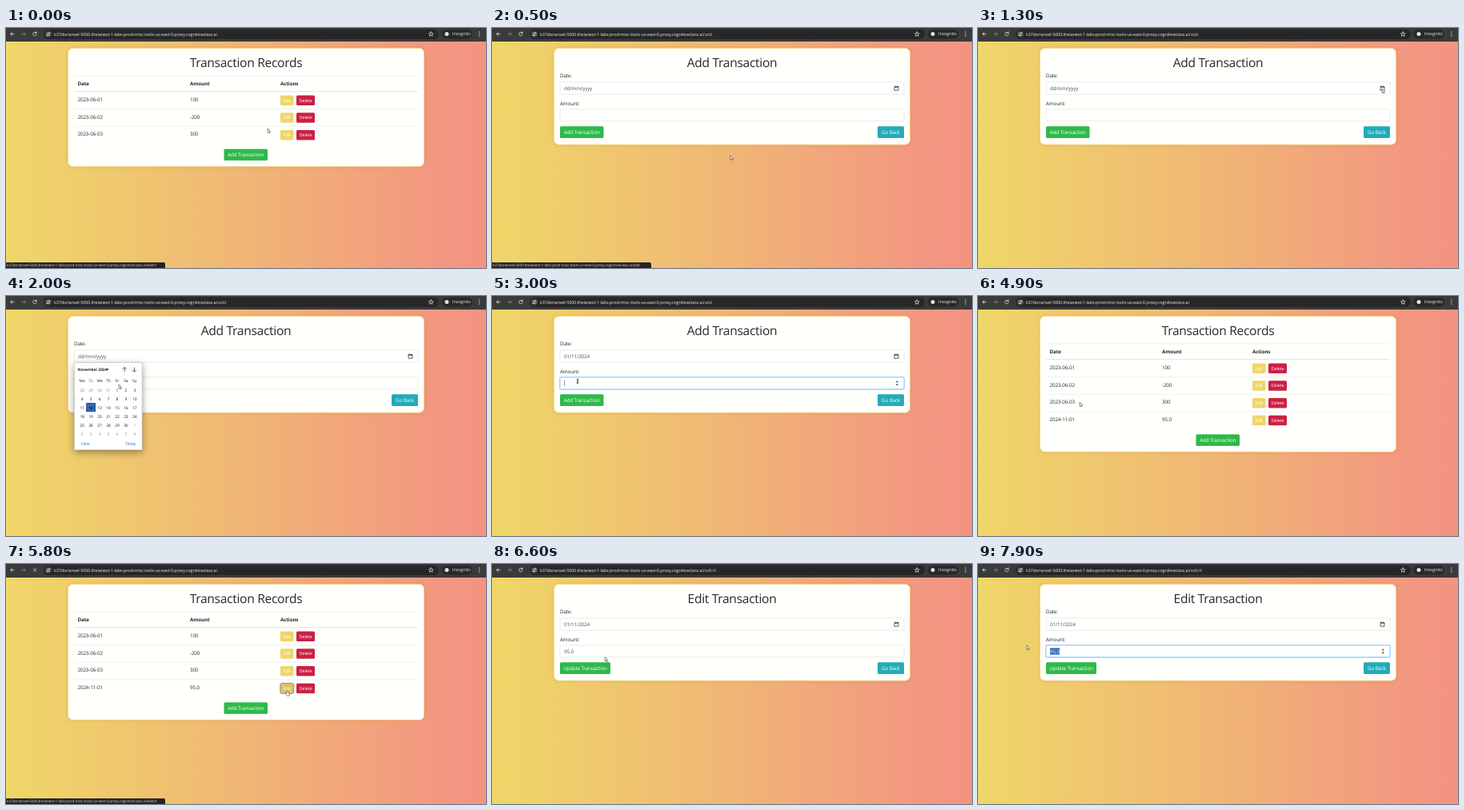
An HTML page for the animation above (8000 ms loop, 600 by 301 pixels).

```html
<!DOCTYPE html>
<html lang="en">
<head>
<meta charset="utf-8">
<title>Transaction Records</title>
<style>
  html, body { margin: 0; width: 100%; height: 100%; overflow: hidden; background: #f0b873; }
  svg { display: block; width: 100%; height: 100%; }
  text {
    font: 6.25px "Open Sans", "Noto Sans", sans-serif;
    letter-spacing: -.02em;
    fill: #26292d;
    text-rendering: geometricPrecision;
    white-space: pre;
  }
  .title { font-size: 15.625px; font-weight: 500; text-anchor: middle; }
  .head { font-weight: 700; }
  .label { fill: #fff; text-anchor: middle; }
  .small { font-size: 5.4px; }
  .value { fill: #495057; }
  .picked { fill: #fff; }
  .url { font-size: 5.45px; fill: #ececec; }
  .path { fill: #c4c4c4; }
  .status { font-size: 4.65px; fill: #d6d6d6; }
  .day { font-size: 4.9px; text-anchor: middle; fill: #16181a; }
  .dim { fill: #8a8a8a; }
  .blue { fill: #1b62c4; }
  .card { fill: #fffffc; stroke: #f8d98c; stroke-width: .8; filter: drop-shadow(0 0 2px rgba(190, 120, 30, .3)); }
  .popup { fill: #fff; stroke: #a9a9a9; stroke-width: .5; filter: drop-shadow(0 3px 5px rgba(0, 0, 0, .38)); }
  .rule { stroke: #dee2e6; stroke-width: .5; }
  .rule.thick { stroke-width: .9; }
  .field { fill: #fffffd; stroke: #d3d7db; stroke-width: .5; }
  .field.focus { stroke: #80bdff; stroke-width: .7; }
  .halo { fill: #bfdeff; }
  .icon { fill: none; stroke: #dcdcdc; stroke-width: .8; stroke-linecap: round; stroke-linejoin: round; }
  .icon.off { stroke: #858585; }
  .ink { fill: none; stroke: #222; stroke-width: .7; }
  .pointer { fill: #fff; stroke: #333; stroke-width: .55; stroke-linejoin: round; }
</style>
</head>
<body>
<svg id="stage" viewBox="0 0 600 301"></svg>
<script>
const LOOP = 8000;
const HOST = "k37dorianvel-5000.theianext-1-labs-prod-misc-tools-us-east-0.proxy.cognitiveclass.ai";
const GREEN = "#2fb94a", GREEN_HOVER = "#209a38", RED = "#cb2044", YELLOW = "#efd568", TEAL = "#23abb8";

// Moments at which the page changes, in ms
const T = { add: 400, calendar: 1400, date: 2300, amount: 2700, nine: 3700, five: 3900,
            submit: 4600, list: 4800, editClick: 5700, edit: 6000, refocus: 6800, drag: 7200 };

// Pointer tip: time, x, y
const PATH = [
  [0, 327, 126], [60, 327, 126], [280, 298, 160], [750, 298, 160], [1300, 505, 76],
  [1450, 505, 76], [2000, 141, 111], [2200, 139, 117], [2320, 139, 117], [2620, 107, 107],
  [4080, 107, 107], [4400, 127, 133], [5000, 127, 133], [5600, 351, 159], [6150, 351, 159],
  [6750, 103, 109], [7200, 103, 109], [7700, 61, 102], [8000, 61, 102]
];

const span = (...pairs) => pairs.map(p => p.join("-")).join(" ");
const group = (on, ...parts) => `<g data-on="${on}">${parts.join("")}</g>`;
const text = (x, y, str, cls = "") => `<text x="${x}" y="${y}" class="${cls}">${str}</text>`;
const rect = (x, y, w, h, attrs = "") => `<rect x="${x}" y="${y}" width="${w}" height="${h}" ${attrs}/>`;
const path = (d, cls = "icon") => `<path d="${d}" class="${cls}"/>`;
const rule = (y, cls = "") => `<line x1="85" x2="515" y1="${y}" y2="${y}" class="rule ${cls}"/>`;
const card = h => rect(77.5, 25.3, 445, h, 'rx="6" class="card"');

function button(x, y, w, h, label, color, small = "") {
  return rect(x, y, w, h, `rx="1.5" fill="${color}"`) +
    text(x + w / 2, y + h / 2 + (small ? 1.95 : 2.2), label, "label " + small);
}

function chrome() {
  const busy = span([300, T.add], [T.submit, T.list], [T.editClick, T.edit]);
  const idle = span([0, 300], [T.add, T.submit], [T.list, T.editClick], [T.edit, LOOP]);
  return rect(0, 0, 600, 17, 'fill="#3a3a3a"') +
    rect(47, 1.4, 494, 12.6, 'rx="6.3" fill="#272727"') +
    rect(544.5, 1.8, 38.5, 11.8, 'rx="5.9" fill="#292929"') +
    path("M10.2 7.5H5.8M7.9 5.3L5.7 7.5L7.9 9.7") +
    path("M19.8 7.5H24.2M22.1 5.3L24.3 7.5L22.1 9.7", "icon off") +
    group(idle, path("M37.9 6.2A2.3 2.3 0 1 0 38.2 8.2M38.2 4.8V6.5H36.5")) +
    group(busy, path("M34.3 5.7L37.9 9.3M37.9 5.7L34.3 9.3")) +
    '<circle cx="53" cy="7.7" r="4.4" fill="#3f3f3f"/>' +
    path("M50.8 6.4H53M55 6.4H55.2M50.8 9H51M53 9H55.2") +
    '<circle cx="54" cy="6.4" r=".8" class="icon"/><circle cx="52" cy="9" r=".8" class="icon"/>' +
    `<text x="60" y="9.6" class="url">${HOST}` +
    `<tspan class="path" data-on="${span([T.add, T.list])}">/add</tspan>` +
    `<tspan class="path" data-on="${span([T.edit, LOOP])}">/edit/4</tspan></text>` +
    path("M531.3 4.9l.8 1.8 2 .2-1.5 1.3.5 2-1.8-1-1.8 1 .5-2-1.5-1.3 2-.2z") +
    '<circle cx="551" cy="7.6" r="2.5" fill="#e2e2e2"/>' +
    text(558, 9.4, "Incognito", "url small") +
    [5, 7.5, 10].map(y => `<circle cx="591.8" cy="${y}" r=".65" fill="#ddd"/>`).join("");
}

function records(rows, on, hover) {
  const bottom = 79.8 + rows.length * 21.75;
  const add = color => button(272.5, bottom + 6.6, 54.5, 14.6, "Add Transaction", color);
  return group(on, card(bottom + 8.7 + 20 - 25.3),
    text(300, 49, "Transaction Records", "title"),
    rule(60), rule(79.6, "thick"),
    text(89.5, 72.2, "Date", "head"), text(230, 72.2, "Amount", "head"), text(343, 72.2, "Actions", "head"),
    ...rows.map(([date, amount], i) => {
      const y = 79.8 + i * 21.75;
      return (i ? rule(y) : "") + text(89.5, y + 12, date) + text(230, y + 12, amount) +
        button(343, y + 4.8, 16.5, 12.3, "Edit", YELLOW, "small") +
        button(363, y + 4.8, 23, 12.3, "Delete", RED, "small");
    }),
    add(GREEN), hover ? group(hover, add(GREEN_HOVER)) : "");
}

function form(title, label, width, on, hover) {
  const submit = color => button(85, 123.3, width, 14.6, label, color);
  return group(on, card(121),
    text(300, 49, title, "title"),
    text(85, 62.3, "Date:"), text(85, 97, "Amount:"),
    rect(85, 67.8, 430, 15.4, 'rx="1.5" class="field"'),
    rect(85, 102, 430, 14.8, 'rx="1.5" class="field"'),
    path("M503 73.4h5v4.8h-5zM503 74.2h5M504.1 72.6v1M506.9 72.6v1", "ink"),
    submit(GREEN), hover ? group(hover, submit(GREEN_HOVER)) : "",
    button(482, 123.3, 33, 14.6, "Go Back", TEAL));
}

function values() {
  const caret = (x, a, b) => group(span([a, b]), rect(x, 105.6, .5, 7.6, 'fill="#333"'));
  return group(span([T.add, T.date]), text(90, 78, "dd/mm/yyyy", "value")) +
    group(span([T.date, T.list], [T.edit, LOOP]), text(90, 78, "01/11/2024", "value")) +
    group(span([T.amount, T.list], [T.refocus, LOOP]),
      rect(83.9, 100.9, 432.2, 17, 'rx="2.4" class="halo"'),
      rect(85, 102, 430, 14.8, 'rx="1.5" class="field focus"'),
      '<path d="M504.6 108.3l1.7-2 1.7 2zM504.6 110.5l1.7 2 1.7-2z" fill="#444"/>') +
    group(span([T.nine, T.five]), text(90, 112.1, "9", "value")) +
    group(span([T.five, T.list]), text(90, 112.1, "95", "value")) +
    group(span([T.edit, LOOP]), text(90, 112.1, "95.0", "value")) +
    caret(90.2, T.amount, T.nine) + caret(93.7, T.nine, T.five) + caret(97.2, T.five, 4300) +
    caret(102, T.refocus, T.drag) +
    group(span([T.drag, LOOP]),
      '<clipPath id="mark"><rect id="sel" x="102" y="105.2" width="0" height="8.6"/></clipPath>',
      '<g clip-path="url(#mark)">' + rect(89.8, 105.2, 12.2, 8.6, 'fill="#2c66bd"') +
      text(90, 112.1, "95.0", "picked") + "</g>");
}

function calendar() {
  const step = 10.93;
  const colX = c => 95.2 + c * step;
  const names = ["Mo", "Tu", "We", "Th", "Fr", "Sa", "Su"];
  const cells = Array.from({ length: 42 }, (_, i) => {
    const n = i - 3, day = n < 1 ? n + 31 : n > 30 ? n - 30 : n;
    const cls = n === 12 ? "picked head" : n < 1 || n > 30 ? "dim" : "";
    return text(colX(i % 7), 119.9 + Math.floor(i / 7) * step, day, "day " + cls);
  });
  return group(span([T.calendar, T.date]),
    rect(85.3, 83.4, 84.9, 109.6, 'rx="1" class="popup"'),
    '<text x="89.5" y="94" class="head" style="font-size:4.9px">November 2024</text>',
    '<path d="M125.2 91.3h3.4l-1.7 2z" fill="#222"/>',
    path("M148.2 95.2V89.4M145.6 92L148.2 89.4L150.8 92M160.4 89.4V95.2M157.8 92.6L160.4 95.2L163 92.6", "ink"),
    ...names.map((n, i) => text(colX(i), 108.3, n, "day " + (i === 1 ? "blue" : ""))),
    rect(100.7, 134.6, 10.8, 10.2, 'fill="#2f6cc2" stroke="#15305c" stroke-width=".8"'),
    ...cells,
    text(99.2, 186.7, "Clear", "day blue"), text(155.7, 186.7, "Today", "day blue"));
}

function editHover() {
  const shade = "#dcc463";
  return group(span([5550, T.edit]), button(343, 149.85, 16.5, 12.3, "Edit", shade, "small")) +
    group(span([T.editClick, T.edit]),
      rect(342.8, 149.6, 16.9, 12.8, 'rx="1.6" fill="none" stroke="#3c6ea8" stroke-width=".9" stroke-dasharray="1.4 .5"'));
}

const status = (tail, a, b) => group(span([a, b]),
  path("M0 301V294H197Q199 294 199 296V301Z", "bar"), text(1, 299.3, HOST + tail, "status"));

function pointer() {
  const hands = span([230, 430], [4340, 4800], [5540, 6200]);
  const beams = span([2540, 4220], [6650, 7350]);
  const arrows = span([0, 230], [430, 2540], [4220, 4340], [4800, 5540], [6200, 6650], [7350, LOOP]);
  return '<g id="cursor">' +
    group(arrows, path("M0 0V5.3L1.2 4.2L2 6L2.9 5.6L2.1 3.9H3.8Z", "pointer")) +
    group(hands, path("M0 0Q.7-.3 1 .4V2.6L3 3Q3.8 3.2 3.6 4L3.1 6.3H.3L-1.6 3.9Q-1.5 3-.5 3.6V.5Q-.5 0 0 0Z", "pointer")) +
    group(beams, path("M-1.2-2.8Q0-2.8 0-2V2Q0 2.8-1.2 2.8M1.2-2.8Q0-2.8 0-2V2Q0 2.8 1.2 2.8", "ink")) + "</g>";
}

const rows = [["2023-06-01", "100"], ["2023-06-02", "-200"], ["2023-06-03", "300"]];
const stage = document.getElementById("stage");
stage.innerHTML =
  `<linearGradient id="sky"><stop stop-color="#efd768"/><stop offset=".45" stop-color="#f0b974"/>
   <stop offset=".9" stop-color="#f39781"/><stop offset="1" stop-color="#f39380"/></linearGradient>` +
  rect(0, 0, 600, 301, 'fill="url(#sky)"') + chrome() +
  records(rows, span([0, T.add]), span([230, T.add])) +
  form("Add Transaction", "Add Transaction", 54.5, span([T.add, T.list]), span([4360, T.list])) +
  records([...rows, ["2024-11-01", "95.0"]], span([T.list, T.edit])) +
  form("Edit Transaction", "Update Transaction", 63, span([T.edit, LOOP])) +
  values() + calendar() + editHover() +
  status("/edit/1", 0, 150) + status("/add", 230, 900) + status("/edit/4", 5550, 6300) +
  pointer();
stage.querySelectorAll(".bar").forEach(b => b.setAttribute("fill", "#232323"));

const timed = [...stage.querySelectorAll("[data-on]")].map(el => ({
  el, spans: el.dataset.on.split(" ").map(s => s.split("-").map(Number))
}));
const cursor = document.getElementById("cursor");
const sel = document.getElementById("sel");

function pointerAt(t) {
  const i = PATH.findIndex(p => p[0] > t);
  const [t0, x0, y0] = PATH[i - 1], [t1, x1, y1] = PATH[i];
  const u = (t - t0) / (t1 - t0), k = u * u * (3 - 2 * u);
  return [x0 + (x1 - x0) * k, y0 + (y1 - y0) * k];
}

function draw() {
  const t = performance.now() % LOOP;
  for (const { el, spans } of timed)
    el.style.display = spans.some(([a, b]) => t >= a && t < b) ? "" : "none";
  const [x, y] = pointerAt(t);
  cursor.setAttribute("transform", `translate(${x} ${y})`);
  const left = Math.min(102, Math.max(89.8, x));
  sel.setAttribute("x", left);
  sel.setAttribute("width", 102 - left);
  requestAnimationFrame(draw);
}
draw();
</script>
</body>
</html>
```
